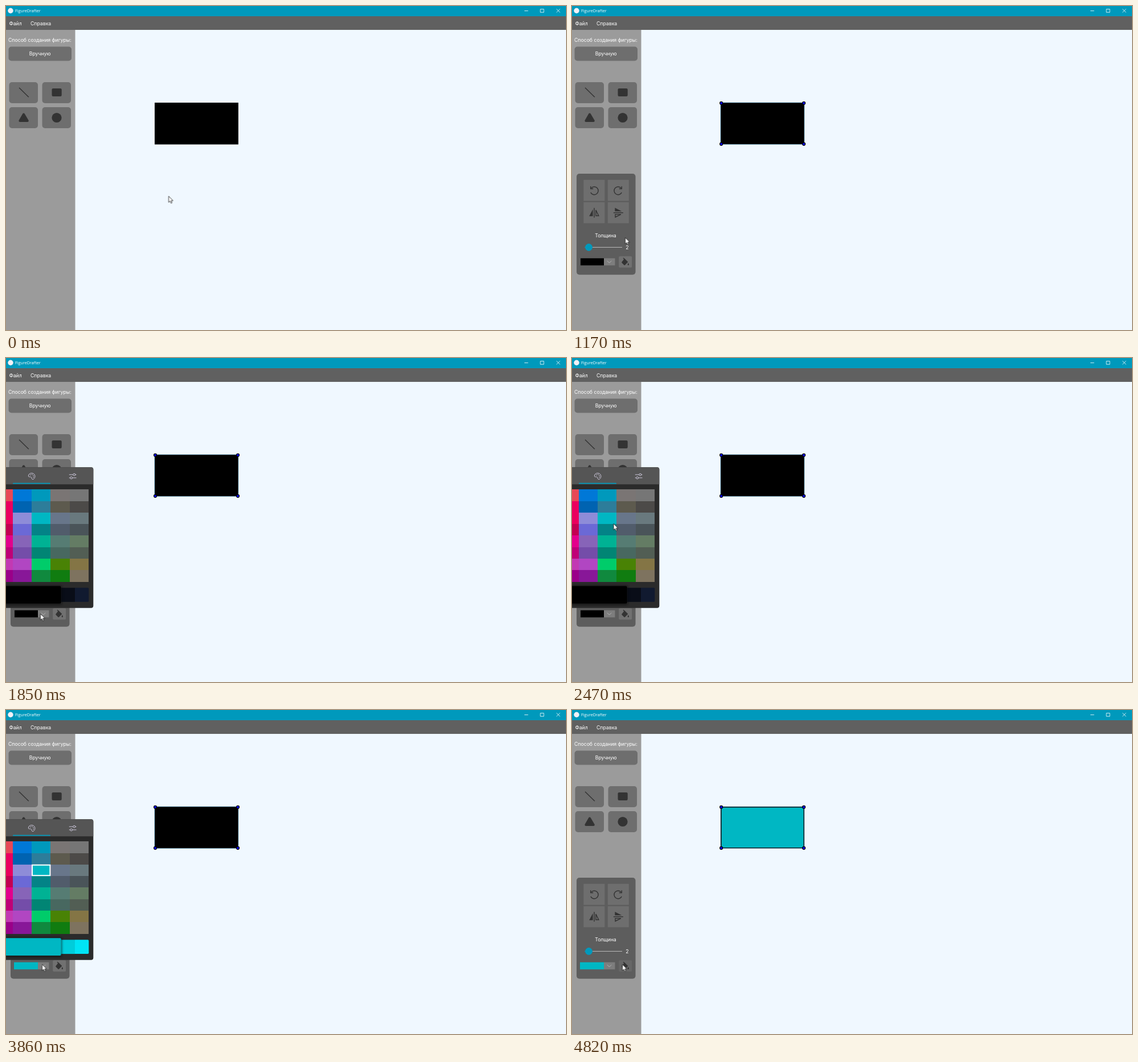
An HTML page for the animation above (5280 ms loop, 983 by 570 pixels).

```html
<!DOCTYPE html>
<html lang="ru">
<head>
<meta charset="utf-8">
<title>FigureDrafter</title>
<style>
  html, body { margin: 0; width: 100%; height: 100%; overflow: hidden; background: #f0f8ff; }
  svg { display: block; width: 100vw; height: 100vh; }
  text { font: 8.7px Inter, Roboto, sans-serif; fill: #fff; }
  .title { font: 7.2px "Open Sans", "Noto Sans", sans-serif; }
  .mid { text-anchor: middle; }
  .btn { fill: #6e6e6e; }
  .icon { fill: #333; }
  .line { fill: none; stroke: #333; stroke-width: 1.4; }
  .thin { fill: none; stroke: #fff; stroke-width: .8; }
  .tab { fill: none; stroke: #d9d3e8; stroke-width: .9; }

  /* one loop: 5280 ms */
  .anim { animation: 5.28s step-end infinite; }
  .selection { animation-name: selection; }
  .shape { animation-name: shape; }
  .thumb { animation-name: thumb; }
  .swatch { animation-name: swatch; }
  .bucket { animation-name: bucket; }
  .popup { animation-name: popup; }
  .picked { animation-name: picked; }
  .main { animation-name: main; }
  .light1 { animation-name: light1; }
  .light2 { animation-name: light2; }
  .tip { animation-name: tip; animation-timing-function: linear; }
  .cursor { animation-name: cursor; }

  @keyframes selection { 0% { visibility: hidden } 11.7%, 100% { visibility: visible } }
  @keyframes shape { 0% { fill: #000 } 89.9%, 100% { fill: #00b7c3 } }
  @keyframes thumb { 0% { fill: #0099bc } 23.25% { fill: #18a8c9 } 24.5%, 100% { fill: #0099bc } }
  @keyframes swatch { 0% { fill: #000; x: 15px; width: 41px } 49.2%, 100% { fill: #00b7c3; x: 14px; width: 42px } }
  @keyframes bucket {
    0% { fill: #717171 } 79.5% { fill: #676767 } 87.25% { fill: #5a5a5a } 89.9%, 100% { fill: #676767 }
  }
  @keyframes popup { 0% { opacity: 0 } 35% { opacity: 1 } 75.5%, 100% { opacity: 0 } }
  @keyframes picked { 0% { opacity: 0 } 49.2%, 100% { opacity: 1 } }
  @keyframes main { 0% { fill: #000 } 49.2%, 100% { fill: #00b7c3 } }
  @keyframes light1 { 0% { fill: #090d18 } 49.2%, 100% { fill: #00cddb } }
  @keyframes light2 { 0% { fill: #111a30 } 49.2%, 100% { fill: #00e4f5 } }
  @keyframes tip { 0%, 55.6% { opacity: 0 } 58.6%, 60.9% { opacity: 1 } 61%, 100% { opacity: 0 } }
  @keyframes cursor {
    0% { transform: translate(285.5px, 334.5px) }
    2.45% { transform: translate(285.5px, 334.5px); animation-timing-function: steps(6) }
    10.4% { transform: translate(290px, 222px); animation-timing-function: steps(2) }
    13% { transform: translate(290px, 218px); animation-timing-function: steps(4) }
    18.3% { transform: translate(190px, 322px); animation-timing-function: steps(3) }
    22.1% { transform: translate(93.5px, 407.5px) }
    23.25% { transform: translate(79px, 421px); animation-timing-function: steps(6) }
    31.2% { transform: translate(60.5px, 450px) }
    35% { transform: translate(60.5px, 450px); animation-timing-function: steps(7) }
    44.1% { transform: translate(74px, 298px); animation-timing-function: steps(4) }
    49.2% { transform: translate(72px, 285px); animation-timing-function: steps(4) }
    54.5% { transform: translate(71.5px, 283.5px) }
    56.95% { transform: translate(71.5px, 283.5px); animation-timing-function: steps(6) }
    65.3% { transform: translate(66px, 410px); animation-timing-function: steps(6) }
    73% { transform: translate(63.5px, 447.5px) }
    75.5% { transform: translate(63.5px, 447.5px); animation-timing-function: steps(5) }
    82.1%, 100% { transform: translate(88.5px, 447.5px) }
  }
</style>
</head>
<body>
<svg viewBox="0 0 983 570" preserveAspectRatio="none">
  <defs>
    <g id="handle"><circle r="3.1"/><circle r="1.9" fill="#00f"/></g>
    <g id="turn">
      <path class="line" d="M-5.2-4.2A7 7 0 1 1-6.2 3.6"/>
      <path class="line" d="M-6.3-7.2V-3H-1.8"/>
    </g>
    <g id="flip">
      <path class="line" d="M0-8.5V8.5" stroke-width="1.2"/>
      <path class="icon" d="M-2.4-6V6H-8.8Z"/>
      <path class="line" d="M2.9-4.6V5.3H7.8Z"/>
    </g>
    <filter id="blur" x="-20%" y="-40%" width="140%" height="180%"><feGaussianBlur stdDeviation="2"/></filter>
  </defs>

  <rect width="983" height="570" fill="#f0f8ff"/>

  <!-- drawing -->
  <rect class="anim shape" x="261.7" y="170.8" width="145.4" height="72" stroke="#000" stroke-width="1.5"/>
  <g class="anim selection">
    <rect x="260.7" y="169.8" width="147.4" height="74" fill="none" stroke="#8fd0ee" stroke-width=".7"/>
    <use href="#handle" x="262" y="170.8"/>
    <use href="#handle" x="407" y="170.8"/>
    <use href="#handle" x="262" y="242.8"/>
    <use href="#handle" x="407" y="242.8"/>
  </g>

  <!-- window frame -->
  <rect width="983" height="18" fill="#0099bc"/>
  <circle cx="8" cy="8.2" r="4.7" fill="#f3f1f7"/>
  <text class="title" x="16" y="11">FigureDrafter</text>
  <path class="thin" d="M910 8.5H916.5M938 5.5H944V11.2H938ZM966.3 5.2L972.5 11.3M972.5 5.2L966.3 11.3"/>
  <rect y="18" width="983" height="24" fill="#606060"/>
  <text x="5.5" y="33.8">Файл</text>
  <text x="43" y="33.8">Справка</text>

  <!-- sidebar -->
  <rect y="42" width="121.5" height="528" fill="#9b9b9b"/>
  <text x="4" y="62.8">Способ создания фигуры:</text>
  <rect class="btn" x="4.5" y="71.5" width="110.5" height="25" rx="5"/>
  <text class="mid" x="59.7" y="87.3">Вручную</text>
  <g class="btn">
    <rect x="5.5" y="134" width="50.5" height="37" rx="5"/>
    <rect x="63.5" y="134" width="50.5" height="37" rx="5"/>
    <rect x="5.5" y="178" width="50.5" height="37" rx="5"/>
    <rect x="63.5" y="178" width="50.5" height="37" rx="5"/>
  </g>
  <path class="line" d="M23 143.7L39.8 160.3"/>
  <rect class="icon" x="80.5" y="145" width="17.2" height="14" rx="2.3"/>
  <path class="icon" d="M31 190.5L24.4 202H37.8Z" stroke="#333" stroke-width="4" stroke-linejoin="round"/>
  <circle class="icon" cx="89" cy="196.5" r="8.6"/>

  <!-- shape settings -->
  <g class="anim selection">
    <rect x="8" y="295" width="103.5" height="177.7" rx="5" fill="#5d5d5d"/>
    <g class="btn">
      <rect x="20.3" y="305.8" width="37" height="37"/>
      <rect x="62.8" y="305.8" width="37" height="37"/>
      <rect x="20.3" y="345.2" width="37" height="37"/>
      <rect x="62.8" y="345.2" width="37" height="37"/>
    </g>
    <use href="#turn" transform="translate(39 324.5)"/>
    <use href="#turn" transform="translate(81 324.5) scale(-1 1)"/>
    <use href="#flip" transform="translate(39 363.7)"/>
    <use href="#flip" transform="translate(81.3 363.7) rotate(90)"/>
    <text class="mid" x="59" y="407.3">Толщина</text>
    <path d="M22 424.5H30" stroke="#0099bc"/>
    <path d="M36 424.5H88" stroke="#b8b8b8"/>
    <circle class="anim thumb" cx="29.5" cy="424.5" r="6.4" fill="#0099bc"/>
    <text x="94.2" y="427.8">2</text>
    <rect x="56" y="443.8" width="19.5" height="12.5" fill="#7d7d7d"/>
    <rect class="anim swatch" x="15" y="443.8" width="41" height="12.5"/>
    <path d="M61.8 448.3L65.5 452L69.2 448.3" fill="none" stroke="#bbb" stroke-width=".9"/>
    <rect class="anim bucket" x="82.2" y="440.3" width="23" height="20" rx="2" fill="#717171"/>
    <path class="icon" d="M92.2 444.2L98.3 450.2L93 455.8Q92.2 456.4 91.4 455.8L87.5 451.8Q86.9 451 87.5 450.3Z"/>
    <path class="line" d="M90 443.3L94.5 448" stroke-width="1"/>
    <path class="icon" d="M98.8 452Q101.2 455.8 98.8 456.2Q96.6 455.8 98.8 452Z"/>
  </g>

  <!-- colour picker -->
  <g class="anim popup">
    <rect x="-30" y="192.3" width="183.3" height="247.4" rx="4" fill="#2b2b2b"/>
    <path d="M0 192.3H149.3Q153.3 192.3 153.3 196.3V222.3H0Z" fill="#555"/>
    <rect x="12" y="219.7" width="66" height="1.9" rx="1" fill="#0099bc"/>
    <path class="tab" d="M39.4 207C40 201.5 49 200.8 50.6 206.5C51.8 210.5 48.5 214.2 46 213.3C44.2 212.5 46 210 43.5 209.2C41.5 208.7 39.2 210 39.4 207Z"/>
    <g fill="#d9d3e8">
      <circle cx="43" cy="205.6" r=".8"/><circle cx="45.8" cy="204.8" r=".8"/>
      <circle cx="48" cy="206.8" r=".8"/><circle cx="48.2" cy="209.6" r=".8"/>
    </g>
    <path class="tab" d="M110.8 205.2H117.8M121.6 205.2H123.5M110.8 210.8H112.7M116.5 210.8H123.5"/>
    <circle class="tab" cx="119.7" cy="205.2" r="1.9"/>
    <circle class="tab" cx="114.6" cy="210.8" r="1.9"/>
    <g id="palette"></g>
    <rect class="anim picked" x="46" y="272.7" width="31.4" height="18.5" fill="none" stroke="#fff" stroke-width="2"/>
    <rect class="anim light1" x="95" y="404.3" width="26" height="24.8"/>
    <path class="anim light2" d="M121 404.3H143.5Q145.3 404.3 145.3 406.1V427.3Q145.3 429.1 143.5 429.1H121Z"/>
    <rect x="-20" y="401.3" width="117.5" height="32" fill="#111" opacity=".75" filter="url(#blur)"/>
    <rect class="anim main" x="-20" y="401.3" width="116.6" height="30.8" rx="2"/>
    <g class="anim tip">
      <rect x="72" y="292" width="48.7" height="17" rx="2" fill="#3c4447" opacity=".85"/>
      <text x="77" y="303.3" font-size="8" style="font-size:8px;fill:#9aa3a6">Cadet</text>
    </g>
  </g>

  <path class="anim cursor" d="M0 0V11L2.5 8.7L4.2 12.5L6 11.7L4.4 8H7.8Z" fill="#fff" stroke="#111" stroke-width=".8"/>
</svg>
<script>
  // Palette rows, left to right; the first column is cut by the window edge.
  const rows = [
    "e74856 0078d7 0099bc 7a7574 767676",
    "ea005e 0063b1 2d7d9a 5d5a4e 4c4a48",
    "ea005e 8e8cd8 00b7c3 68768a 69797e",
    "c30052 6b69d6 038387 515c6b 4a5459",
    "e3008c 8764b8 00b294 567c73 647c64",
    "bf0077 744da9 018574 486860 525e54",
    "c239b3 b146c2 00cc6a 498205 847545",
    "9a0089 881798 10893e 107c10 7e735f"
  ];
  const w = 33.4, h = 20.3;
  document.getElementById("palette").innerHTML = rows.map((row, r) =>
    row.split(" ").map((color, c) =>
      `<rect x="${-21.8 + c * w}" y="${231.2 + r * h}" width="${w}" height="${h}" fill="#${color}" shape-rendering="crispEdges"/>`
    ).join("")).join("");
</script>
</body>
</html>
```
